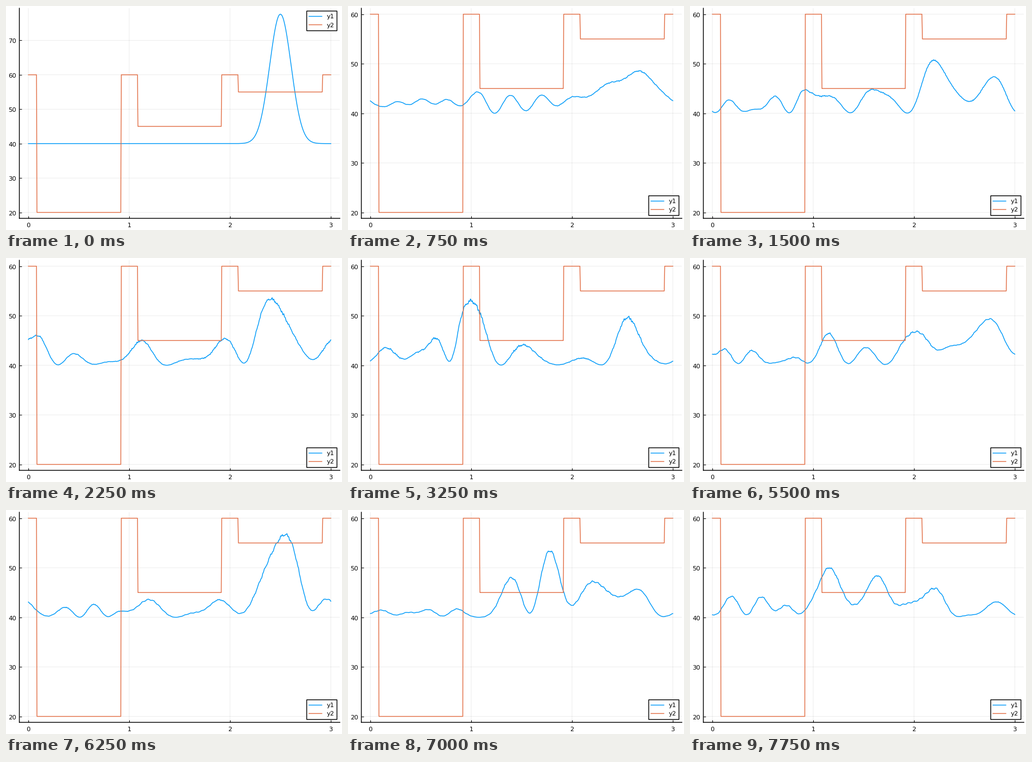
A matplotlib script that plays this animation: 600x400 px, repeating every 8 s.

```python
import numpy as np
import matplotlib.pyplot as plt
from matplotlib.animation import FuncAnimation
from matplotlib.patches import Rectangle
from matplotlib.transforms import ScaledTranslation

plt.rcParams["font.family"] = "DejaVu Sans"
plt.rcParams["path.snap"] = False

W, H, DPI = 600, 400, 100
FRAMES, INTERVAL = 32, 250
PX = 72 / DPI  # one pixel in points
LINE = 1.4 * PX
BLUE, ORANGE = "#009af9", "#e26f46"

# Three wells between thin barriers on a ring
N = 600
DT, STEPS = 0.001, 50
x = np.linspace(0, 3, N)
dx = x[1] - x[0]
# Wave numbers symmetric about zero, so they sit at half steps
k = np.fft.ifftshift(np.linspace(-np.pi / dx, np.pi / dx, N))
barrier = np.abs(x - np.round(x)) < 1 / 12
V = np.where(barrier, 60.0, np.array([20.0, 45.0, 55.0, 60.0])[x.astype(int)])


def evolve():
    """Split-step evolution of a Gaussian packet, one density per frame."""
    psi = np.exp(-((x - 2.5) / 0.15) ** 2 / 2).astype(complex)
    psi /= np.sqrt(np.sum(np.abs(psi) ** 2) * dx)
    half_v = np.exp(-0.5j * DT * V)
    kinetic = np.exp(-0.5j * DT * k**2)
    out = []
    for _ in range(FRAMES):
        out.append(40 + 10 * np.abs(psi) ** 2)
        for _ in range(STEPS):
            psi = half_v * np.fft.ifft(kinetic * np.fft.fft(half_v * psi))
    return out


density = evolve()

fig = plt.figure(figsize=(W / DPI, H / DPI), dpi=DPI, facecolor="white")
left, right, top, bottom = 23.8, 596.2, 4, 379.2
ax = fig.add_axes([left / W, 1 - bottom / H, (right - left) / W, (bottom - top) / H])
ax.set_xlim((left - 40) / 180, (right - 40) / 180)
ax.set_xticks(range(4))
ax.set_yticks(range(20, 80, 10))
ax.set_axisbelow(True)
ax.grid(color="black", alpha=0.1, lw=0.7 * PX)
ax.tick_params(direction="in", length=4 * PX, width=PX, labelsize=8)
ax.tick_params(axis="x", pad=8 * PX)
ax.tick_params(axis="y", pad=5.5 * PX)
for label in ax.get_yticklabels():
    label.set_transform(label.get_transform() + ScaledTranslation(0, -1 / DPI, fig.dpi_scale_trans))
for side in ("top", "right"):
    ax.spines[side].set_visible(False)
for side in ("left", "bottom"):
    ax.spines[side].set_linewidth(LINE)

wave, = ax.plot(x, density[0], color=BLUE, lw=LINE)
ax.plot(x, V, color=ORANGE, lw=LINE)

# Legend in pixel coordinates
over = fig.add_axes([0, 0, 1, 1])
over.set_xlim(0, W)
over.set_ylim(H, 0)
over.axis("off")
box = Rectangle((537, 0), 54, 35.2, fc="white", ec="black", lw=LINE)
over.add_patch(box)
rows = []
for name, color, dy in (("y1", BLUE, 9.5), ("y2", ORANGE, 24.5)):
    line, = over.plot([541, 564], [0, 0], color=color, lw=LINE)
    text = over.text(573, 0, name, fontsize=8, va="center_baseline")
    rows.append((line, text, dy))


def draw(i):
    wave.set_ydata(density[i])
    peak = max(60, density[i].max())
    pad = (peak - 20) * 0.03
    ax.set_ylim(20 - pad, peak + pad)
    y = 9 if i == 0 else 338.9
    box.set_y(y)
    for line, text, dy in rows:
        line.set_ydata([y + dy, y + dy])
        text.set_y(y + dy)
    return wave,


anim = FuncAnimation(fig, draw, frames=FRAMES, interval=INTERVAL, repeat=True, repeat_delay=0)
plt.show()
```
